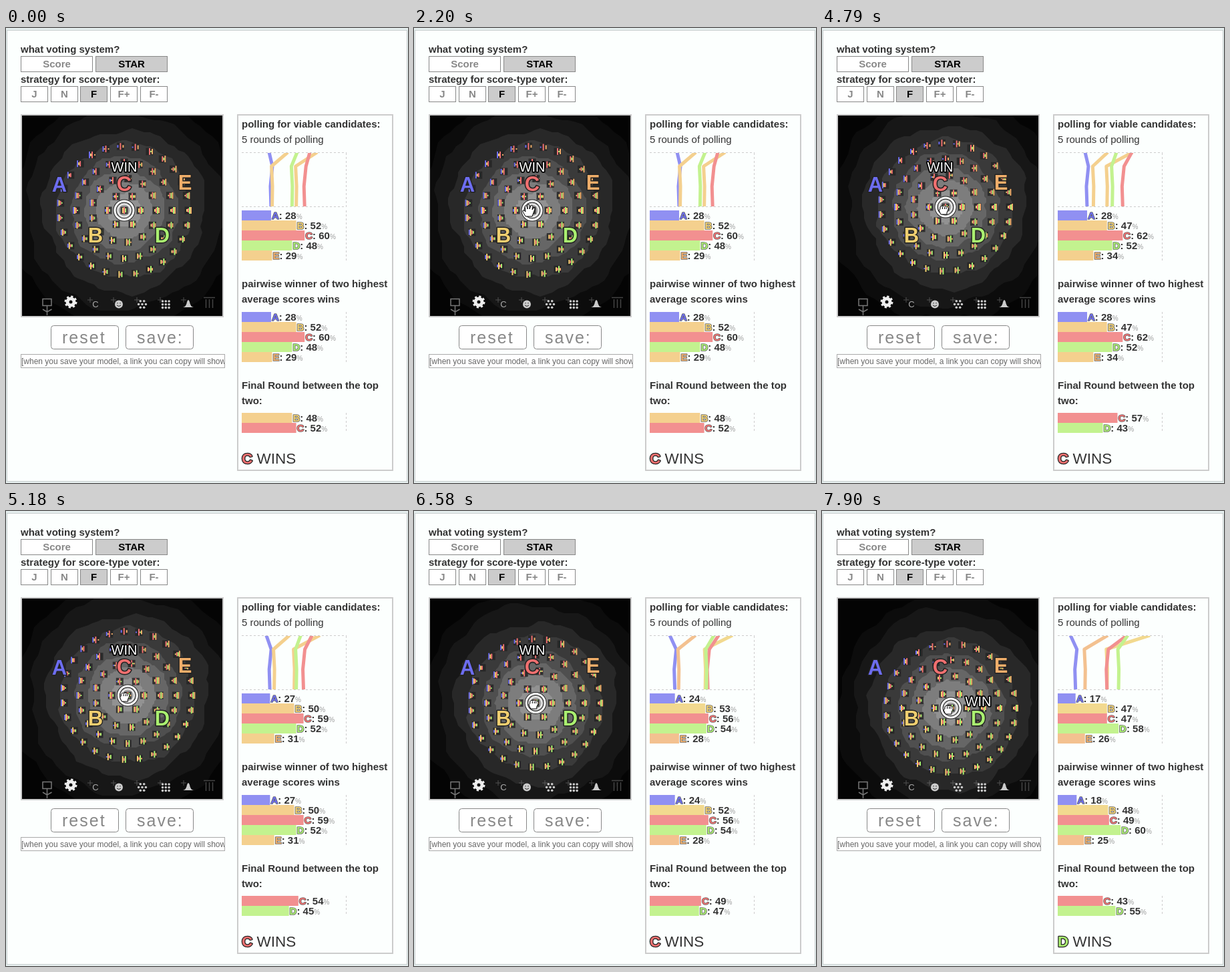
These frames come from a looping animation (602 by 681 pixels, 8000 ms). An HTML page:

```html
<!DOCTYPE html>
<html lang="en">
<head>
<meta charset="utf-8">
<title>Voting model</title>
<style>
html, body { margin: 0; width: 100%; height: 100%; overflow: hidden; background: #e6efef; }
svg { display: block; font-family: "Liberation Sans", Arial, sans-serif; font-size: 15px; fill: #333; }
text { white-space: pre; }
.b { font-weight: bold; }
.mid { text-anchor: middle; }
.edge { paint-order: stroke; stroke-linejoin: round; }
.dash { stroke: #ccc; stroke-dasharray: 3 3; fill: none; }
</style>
</head>
<body>
<svg id="stage" width="602" height="681" viewBox="0 0 602 681">
  <defs><clipPath id="arena"><rect x="24" y="131" width="300" height="300"/></clipPath>
  <clipPath id="chart"><rect x="353" y="187" width="157" height="80"/></clipPath>
  <clipPath id="field"><rect x="23" y="489" width="304" height="19"/></clipPath></defs>
  <g id="page"></g>
  <g clip-path="url(#arena)"><g id="model"></g><g id="tools"></g><g id="people"></g></g>
  <g id="results"></g>
  <g id="cursor"></g>
</svg>
<script>
const LOOP = 8000;
const $ = id => document.getElementById(id);
const NAMES = 'ABCDE';
const STRONG = ['#6d6df0', '#f0cf70', '#f07070', '#aaf070', '#f0ae6a'];
const SOFT = ['#9090f2', '#f2d98f', '#f29090', '#c3f28f', '#f3c190'];
const SHARED = '#f4d08e';
const SPOTS = [[80, 234], [134, 310], [177, 233], [234, 310], [268, 231]];
const BANDS = [[172, '#0c0c0c'], [148, '#171717'], [122, '#282828'], [101, '#3a3a3a'],
  [80, '#4f4f4f'], [60, '#666'], [42, '#7d7d7d'], [25, '#929292'], [12, '#a4a4a4']];

// Bursts of redraws: first time, last time, count
const BURSTS = [[820, 1300, 5], [1450, 1810, 4], [1960, 2200, 3], [2730, 3090, 4], [3240, 3240, 1],
  [3760, 4010, 3], [4160, 4160, 1], [4310, 4910, 6], [5060, 5180, 2], [5320, 5560, 3],
  [5810, 6050, 3], [6220, 6940, 7], [7060, 7780, 7], [7900, 7900, 1]];
const STEPS = [0, 670].concat(BURSTS.flatMap(([a, b, n]) =>
  Array.from({ length: n }, (_, i) => n > 1 ? a + (b - a) * i / (n - 1) : a)));

// c: crowd centre, s: scores, duel: B C D head to head, poll: first-round x
const START = { c: [177, 273], s: [28, 52, 60, 48, 29], duel: [48, 52, 48], poll: [394, 466, 455, 436, 422], shared: true };
const LEFT = { c: [173, 279], s: [30, 56, 60, 50, 26], duel: [48, 52, 48], poll: [392, 467, 449, 435, 418] };
const KEYS = [
  { t: 0, ...START }, { t: 2600, ...START }, { t: 3760, ...LEFT }, { t: 4160, ...LEFT },
  { t: 4790, c: [185, 268], s: [28, 47, 62, 52, 34], duel: [45, 57, 43], poll: [394, 465, 464, 441, 428], shared: true },
  { t: 5810, c: [178, 289], s: [25, 55, 54, 52, 26], duel: [51, 48, 49], poll: [383, 478, 449, 442, 419] },
  { t: 7300, c: [186, 286], s: [23, 51, 57, 56, 29], last: [23, 50, 57, 56, 29], duel: [47, 49, 46], poll: [383, 476, 463, 456, 424] },
  { t: 7900, c: [193, 295], s: [17, 47, 47, 58, 26], last: [18, 48, 49, 60, 25], duel: [44, 43, 55], poll: [372, 491, 457, 458, 428] }
];
const POINTER = [[670, 28, 679], [820, 90, 645], [940, 150, 590], [1060, 205, 515], [1180, 245, 440],
  [1300, 262, 400], [1450, 240, 360], [1810, 185, 305], [1960, 182, 295], [2200, 172, 273],
  [2600, 172, 273], [3760, 171, 281], [4160, 172, 279], [4790, 182, 272], [5810, 170, 288],
  [7300, 187, 290], [7900, 189, 297]];

const mix = (a, b, p) => a.map((v, i) => v + (b[i] - v) * p);
const segment = (keys, t, time) => {
  let i = keys.length - 1;
  while (i > 0 && time(keys[i]) > t) i--;
  const a = keys[i], b = keys[Math.min(i + 1, keys.length - 1)];
  const p = a === b ? 0 : Math.max(0, (t - time(a)) / (time(b) - time(a)));
  return [a, b, p];
};

const rect = (x, y, w, h, fill, extra = '') => `<rect x="${x}" y="${y}" width="${w}" height="${h}" fill="${fill}" ${extra}/>`;
const text = (x, y, str, cls = '', extra = '') => `<text x="${x}" y="${y}" class="${cls}" ${extra}>${str}</text>`;
const circle = (x, y, r, extra) => `<circle cx="${x}" cy="${y}" r="${r}" ${extra}/>`;
const button = (x, y, w, label, on) =>
  rect(x + .5, y + .5, w - 1, 23, on ? '#ccc' : '#fff', 'stroke="#888"') +
  text(x + w / 2, y + 17, label, 'b mid', `fill="${on ? '#000' : '#888'}"`);
const bigButton = (x, label) =>
  rect(x + .5, 445.5, 101, 35, '#fff', 'rx="4" stroke="#888"') +
  text(x + 17, 472, label, '', 'font-size="25" letter-spacing="2" fill="#888"');

function drawPage() {
  $('page').innerHTML =
    rect(1.5, 3.5, 599, 675, '#fcfffe', 'stroke="#c8cece"') +
    text(22, 37, 'what voting system?', 'b') + button(22, 42, 108, 'Score') + button(134, 42, 108, 'STAR', true) +
    text(22, 82, 'strategy for score-type voter:', 'b') +
    ['J', 'N', 'F', 'F+', 'F-'].map((s, i) => button(22 + Math.round(i * 44.7), 87, 41, s, s === 'F')).join('') +
    rect(23, 130, 302, 302, '#040404', 'stroke="#ccc" stroke-width="2"') +
    bigButton(67, 'reset') + bigButton(179, 'save:') +
    rect(22.5, 488.5, 305, 20, '#fff', 'stroke="#aaa"') +
    `<g clip-path="url(#field)">${text(23, 503, '[when you save your model, a link you can copy will show', '', 'font-size="12" fill="#666"')}</g>` +
    rect(347, 130, 232, 532, '#fcfffe', 'stroke="#ccc" stroke-width="2"') +
    text(353, 149, 'polling for viable candidates:', 'b') + text(353, 172, '5 rounds of polling') +
    text(353, 388, 'pairwise winner of two highest', 'b') + text(353, 411, 'average scores wins', 'b') +
    text(353, 540, 'Final Round between the top', 'b') + text(353, 563, 'two:', 'b') +
    '<path class="dash" d="M353 186.5H510M353 267.5H510M509.5 187V267M509.5 273V348M509.5 425V500M509.5 576V606"/>';
}

function drawTools() {
  const dot = (x, y) => circle(x, y, 1.8, 'fill="#ccc"');
  let out = '<path d="M55 405.5h13v10h-13zM61.500 416v14M55 421l6.500 4l7 -4" fill="none" stroke="#777" stroke-width="1.500"/>' +
    circle(97, 410, 5, 'fill="none" stroke="#eee" stroke-width="5"') +
    circle(97, 410, 8, 'fill="none" stroke="#eee" stroke-width="3" stroke-dasharray="3.14"') +
    text(134, 418, 'C', 'mid', 'font-size="13" fill="#aaa"') +
    circle(169, 413.500, 6, 'fill="#ccc"') +
    '<path d="M166 415q3 3 6 0M167 411v1.500M171 411v1.500" stroke="#222" fill="none"/>' + dot(204, 413.5);
  for (let i = 0; i < 6; i++) out += dot(204 + 5.4 * Math.cos(i * Math.PI / 3), 413.5 + 5.4 * Math.sin(i * Math.PI / 3));
  for (let i = 0; i < 9; i++) out += dot(234.5 + i % 3 * 4.8, 409 + Math.floor(i / 3) * 4.8);
  out += '<path d="M265 418q5 -1 6 -8q2 -6 4 0q1 7 6 8z" fill="#ccc"/>' +
    '<path d="M296 403.500h17M299.500 406v13M304.500 406v13M309.500 406v13" stroke="#444" stroke-width="1.500"/>';
  for (let x = 126; x < 280; x += 35) out += `<path d="M${x - 4} 407h8M${x} 403v8" stroke="#999" opacity=".45"/>`;
  $('tools').innerHTML = out;
}

const VOTERS = [[0, 0]];
for (const r of [24, 48, 72, 96]) {
  const n = Math.floor(2 * Math.PI * r / 22);
  for (let i = 0; i < n; i++) {
    const a = 2 * Math.PI * i / n;
    VOTERS.push([r * Math.cos(a), r * Math.sin(a)]);
  }
}

function band([r, fill], i, [cx, cy]) {
  const pts = [];
  for (let k = 0; k < 90; k++) {
    const a = k * Math.PI / 45;
    const d = r * (1 + .025 * Math.sin(3 * a + i * 1.7) + .02 * Math.sin(7 * a + i * 2.3) + .015 * Math.sin(17 * a + i));
    pts.push([cx + d * Math.cos(a), cy + d * Math.sin(a)].map(v => Math.round(v / 3) * 3));
  }
  return `<polygon points="${pts.join(' ')}" fill="${fill}"/>`;
}

function ballot(x, y) {
  const far = SPOTS.map(([sx, sy]) => Math.hypot(sx - x, sy - y));
  const min = Math.min(...far), max = Math.max(...far);
  const bars = far.map((d, i) => {
    const h = 2 * Math.round(5 * (max - d) / (max - min));
    return rect(x - 5 + i * 2, y - h / 2, 2, h, STRONG[i]);
  });
  return rect(x - 5.5, y - 5.5, 11, 11, '#222', 'opacity=".8"') + bars.join('');
}

function drawModel(c, winner) {
  const ring = (r, w, color) => circle(c[0], c[1], r, `fill="none" stroke="${color}" stroke-width="${w}"`);
  $('model').innerHTML = BANDS.map((b, i) => band(b, i, c)).join('') +
    VOTERS.map(([x, y]) => ballot(c[0] + x, c[1] + y)).join('') +
    ring(14, 5, '#222') + ring(14, 3, '#fff') + ring(9.5, 2, '#eee');
  const [wx, wy] = SPOTS[winner];
  $('people').innerHTML = SPOTS.map(([x, y], i) =>
    text(x, y + 11, NAMES[i], 'b mid edge', `font-size="31" fill="${STRONG[i]}" stroke="#222" stroke-width="3"`)).join('') +
    text(wx, wy - 18, 'WIN', 'mid edge', 'font-size="20" fill="#fff" stroke="#000" stroke-width="3.500"');
}

const letter = i => `<tspan class="edge" fill="${STRONG[i]}" stroke="#333" stroke-opacity=".75" stroke-width="1.700">${NAMES[i]}</tspan>`;

function bar(i, value, y, colors) {
  const w = Math.round(value) * 1.57;
  return rect(353, y, w.toFixed(1), 15, colors[i]) +
    text((354 + w).toFixed(1), y + 13, `${letter(i)}: ${Math.round(value)}<tspan font-weight="normal" font-size="10" fill="#999">%</tspan>`, 'b');
}

function drawResults(state) {
  const { s, last, poll, finalists, duel, winner, colors } = state;
  const bend = [2, -1, 2, -1, -1];
  const lines = s.map((v, i) => {
    const x = 353 + v * 1.57;
    return `<path d="M${poll[i]} 186L${x + bend[i]} 207L${x - bend[i] / 2} 237L${x} 268" fill="none" stroke="${colors[i]}" stroke-width="5" stroke-linejoin="round"/>`;
  });
  $('results').innerHTML = `<g clip-path="url(#chart)">${lines.join('')}</g>` +
    s.map((v, i) => bar(i, v, 273 + i * 15, colors)).join('') +
    last.map((v, i) => bar(i, v, 425 + i * 15, colors)).join('') +
    finalists.map((i, k) => bar(i, duel[i - 1], 576 + k * 15, colors)).join('') +
    text(353, 652, `<tspan class="b edge" fill="${STRONG[winner]}" stroke="#222" stroke-width="2.500">${NAMES[winner]}</tspan> WINS`, '', 'font-size="22.500"');
}

const ARROW = 'M0 0V16L4 12L7 19L9.500 18L6.500 11.500H12Z';
const OPEN = 'M-5 9L-9 2Q-10 -1 -7 0L-5 2L-6 -6Q-5 -9 -3 -6L-2 -2V-8Q0 -10 1 -8V-2L3 -7Q5 -9 6 -6L5 -1L7 -4Q9 -5 9 -2L6 6L5 9Z';
const GRAB = 'M-4 7L-6 3Q-8 0 -5 -1V-4Q-3 -7 -1 -5Q1 -7 3 -5Q5 -6 6 -4Q8 -4 7 0L5 4V7ZM-1.500 -4V-1M1.500 -4V-1M4 -4V-1';

function drawCursor(t) {
  if (t < 670) { $('cursor').innerHTML = ''; return; }
  const [a, b, p] = segment(POINTER, t, k => k[0]);
  const [, x, y] = mix(a, b, p);
  const shape = t < 1960 ? ARROW : t < 2730 ? OPEN : GRAB;
  $('cursor').innerHTML = `<path transform="translate(${x} ${y})" d="${shape}" fill="#fff" stroke="#000" stroke-linejoin="round"/>`;
}

function render(t) {
  const [a, b, p] = segment(KEYS, t, k => k.t);
  const s = mix(a.s, b.s, p), last = mix(a.last || a.s, b.last || b.s, p), duel = mix(a.duel, b.duel, p);
  const finalists = [1, 2, 3].sort((i, j) => last[j] - last[i]).slice(0, 2).sort();
  const winner = duel[finalists[0] - 1] >= duel[finalists[1] - 1] ? finalists[0] : finalists[1];
  const colors = SOFT.map((color, i) => a.shared && (i === 1 || i === 4) ? SHARED : color);
  drawModel(mix(a.c, b.c, p), winner);
  drawResults({ s, last, duel, finalists, winner, colors, poll: mix(a.poll, b.poll, p) });
  drawCursor(t);
}

let shown = -1;
const begin = performance.now();
function tick() {
  const t = (performance.now() - begin) % LOOP;
  const step = STEPS.filter(v => v <= t + 1).pop();
  if (step !== shown) render(shown = step);
  requestAnimationFrame(tick);
}
drawPage();
drawTools();
tick();
</script>
</body>
</html>
```
